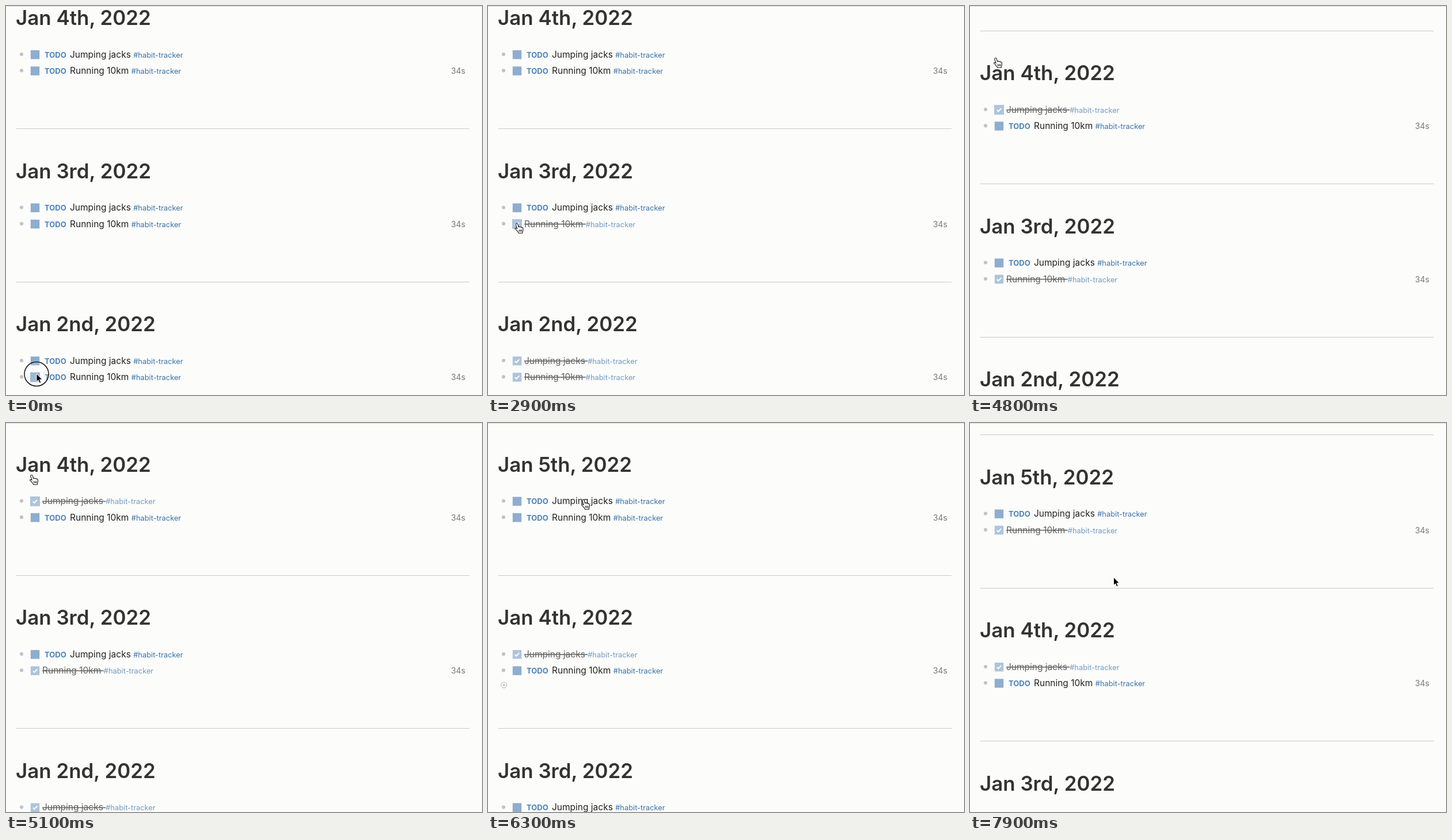
Recreate the animation shown at these times as an HTML page. Size 827 by 677 pixels, loop 8 s.

```html
<!DOCTYPE html>
<html lang="en">
<head>
<meta charset="utf-8">
<title>Habit journal</title>
<style>
  html, body { margin: 0; width: 100%; height: 100%; overflow: hidden; background: #fcfcfb; }
  svg { display: block; width: 827px; height: 677px; font-family: Inter, sans-serif; }
  text { white-space: pre; font-size: 15.5px; fill: #222; }
  .title { font-size: 34.9px; font-weight: 600; fill: #333330; }
  .todo { font-size: 13px; font-weight: 700; fill: #4b83b8; }
  .tag { font-size: 12.85px; fill: #3872a5; }
  .time { font-size: 13.8px; fill: #777; text-anchor: end; }
  .strike { text-decoration: line-through; }
  .done { opacity: .7; }
  .box { fill: #8eadcf; }
  .tick { fill: none; stroke: #fff; stroke-width: 2; }
  .bullet { fill: #c3c3c6; }
  .rule { stroke: #cacac8; }
  .add { fill: none; stroke: #b0b0b4; }
  .ring { fill: #fff; fill-opacity: .15; stroke: #111; stroke-width: 1.5; }
  .arrow { fill: #000; stroke: #fff; }
  .hand { fill: #fff; stroke: #111; stroke-width: 1.1; stroke-linejoin: round; }
</style>
</head>
<body>
<svg id="stage" viewBox="0 0 827 677"></svg>
<script>
const LOOP = 8000, STEP = 100, TRAVEL = 500, SECTION = 266.5, BOX_X = 50.5;
const days = ['Jan 5th, 2022', 'Jan 4th, 2022', 'Jan 3rd, 2022', 'Jan 2nd, 2022'];
const habits = ['Jumping jacks ', 'Running 10km '];

// Where the pointer rests, and when it clicks there
const stops = [
  { arrive: 0, x: 53, y: 640, press: 0 },
  { arrive: 1200, x: 50, y: 618, press: 1400 },
  { arrive: 2500, x: 50, y: 379, press: 2600 },
  { arrive: 3900, x: 44.5, y: 91, press: 4200 },
  { arrive: 5700, x: 165.5, y: 134 },
  { arrive: 6900, x: 51, y: 187, press: 7000 },
  { arrive: 7800, x: 249.5, y: 268.5 },
];

const progress = (t, from, to) => Math.min(1, Math.max(0, (t - from) / (to - from)));
const smooth = p => p * p * (3 - 2 * p);
const fling = (t, from, to) => 1 - (1 - progress(t, from, to)) ** 1.53;

const scrollAt = t =>
  96 * (fling(t, 4500, 4700) - fling(t, 5000, 5300)) + 340 * fling(t, 5800, 6400);
const sectionTop = (day, scroll) => (day - 1) * SECTION + scroll;
const rowY = (day, row, scroll) => sectionTop(day, scroll) + 84.2 + row * 28.3;

function pointerAt(t) {
  const i = stops.findLastIndex(s => s.arrive <= t);
  const here = stops[i], next = stops[i + 1] || here;
  const p = smooth(progress(t, next.arrive - TRAVEL, next.arrive)) * (next !== here);
  return {
    x: here.x + (next.x - here.x) * p,
    y: here.y + (next.y - here.y) * p,
    // A resting pointer keeps its hover while the page scrolls beneath it
    scroll: scrollAt(p ? t : here.arrive),
  };
}

function hoverAt(t) {
  const { x, y, scroll } = pointerAt(t);
  const isOver = (day, row) =>
    Math.abs(x - BOX_X) < 9 && Math.abs(y - rowY(day, row, scroll)) < 9;
  const inAddZone = day => Math.abs(y - sectionTop(day, scroll) - 138) < 13;
  return { isOver, inAddZone };
}

const clicks = stops.filter(s => 'press' in s)
  .map(s => ({ press: s.press, isOver: hoverAt(s.press).isOver }));

function rowMarkup(day, row, t, hover) {
  const y = rowY(day, row, scrollAt(t)), base = y + 5.6;
  const done = clicks.some(c => t > c.press && c.isOver(day, row));
  const half = hover.isOver(day, row) ? 8.5 : 7.7;
  const box = `<rect class="box" x="${BOX_X - half}" y="${y + .5 - half}" width="${2 * half}" height="${2 * half}"/>`;
  const label = `<tspan class="${done ? 'strike' : ''}">${habits[row]}</tspan><tspan class="tag">#habit-tracker</tspan>`;
  const body = done
    ? `<g class="done">${box}<path class="tick" d="M46.8 ${y + .8}l2.5 2.5 5-5.4"/><text x="63" y="${base}">${label}</text></g>`
    : `${box}<text class="todo" x="67" y="${base}">TODO</text><text x="111" y="${base}">${label}</text>`;
  const time = row ? `<text class="time" x="798" y="${base}">34s</text>` : '';
  return `<circle class="bullet" cx="27" cy="${y - .2}" r="3.1"/>${body}${time}`;
}

function sectionMarkup(day, t, hover) {
  const top = sectionTop(day, scrollAt(t));
  const add = hover.inAddZone(day)
    ? `<path class="add" d="M22.7 ${top + 138}a5 5 0 1 0 10 0a5 5 0 1 0-10 0m2.5 0h5m-2.5-2.5v5"/>` : '';
  return `<path class="rule" d="M17.5 ${Math.round(top - 53.2) + .5}H805.5"/>
    <text class="title" x="17" y="${top + 33.2}">${days[day]}</text>
    ${habits.map((_, row) => rowMarkup(day, row, t, hover)).join('')}${add}`;
}

function pointerMarkup(t, hover) {
  const { x, y } = pointerAt(t);
  const pressed = clicks.some(c => c.press === t);
  const hand = !pressed && days.some((_, day) =>
    hover.inAddZone(day) || habits.some((_, row) => hover.isOver(day, row)));
  const ring = pressed ? `<circle class="ring" cx="${x}" cy="${y + .5}" r="21"/>` : '';
  const shape = hand
    ? `<path class="hand" d="M-1.8 1.2C-2-.8 1.2-1.2 1.8.8L3 5.6C3.6 4.6 5.4 4.7 5.8 5.9C6.6 5.1 8.1 5.4 8.4 6.6
        C9.3 6 10.6 6.6 10.8 7.8C11.3 10 11 12 10 14L9.8 16.2H3L2.4 14.4C1 13-.6 10.6-2.4 9.4
        C-3.6 8.4-2.4 6.8-.8 7.6L.6 8.6ZM4 10.2l.3 3.4M6.2 10.2l.2 3.4M8.3 10.2v3.4"/>`
    : '<path class="arrow" d="M0 0V14L3.1 11.1L5.3 16.2L7.8 15.1L5.6 10.2H10Z"/>';
  return `${ring}<g transform="translate(${x} ${y})">${shape}</g>`;
}

const stage = document.getElementById('stage');
let shown = -1;

function render(now) {
  const t = Math.floor((now % LOOP) / STEP) * STEP;
  if (t === shown) return;
  shown = t;
  const hover = hoverAt(t);
  stage.innerHTML = days.map((_, day) => sectionMarkup(day, t, hover)).join('')
    + '<path d="M0 .5H827" stroke="#d9d9e0"/>' + pointerMarkup(t, hover);
}

const start = performance.now();
function frame() {
  render(performance.now() - start);
  requestAnimationFrame(frame);
}
frame();
</script>
</body>
</html>
```
